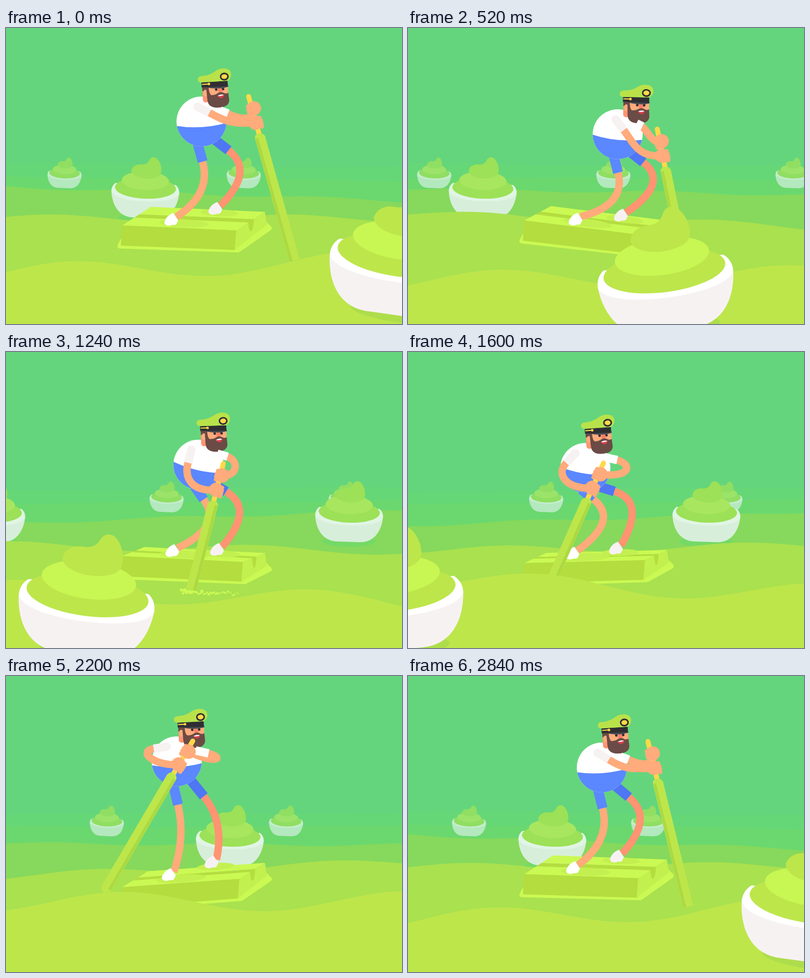
Write an HTML page with a canvas that moves like this. It is 800x600 px and loops after 2880 ms.

```html
<!DOCTYPE html>
<html lang="en">
<head>
<meta charset="utf-8">
<title>Matcha paddler</title>
<style>
html, body { margin: 0; width: 100%; height: 100%; overflow: hidden; background: #64d57d; }
canvas { display: block; width: 800px; height: 600px; }
</style>
</head>
<body>
<canvas width="800" height="600"></canvas>
<script>
const ctx = document.querySelector('canvas').getContext('2d');
const LOOP = 2880, STEP = 40, TAU = Math.PI * 2, RAD = Math.PI / 180;
const SKIN = '#ffab7b', SKIN_FAR = '#ff9472', BLUE = '#5b87ff', BLUE_FAR = '#4f76f3';
const LIME = '#bde64b', BRIGHT = '#cbf953', DARK_LIME = '#b4dd3f', WHITE = '#fff', OFF_WHITE = '#f7f2f2';
const HAIR = '#6b4b45', INK = '#302e33', YELLOW = '#ffd84a';
const OAR_LENGTH = 345, WATERLINE = 482;

const mod = (a, n) => ((a % n) + n) % n;
const random = seed => mod(Math.sin(seed * 12.9898) * 43758.5453, 1);
const add = (p, x, y) => [p[0] + x, p[1] + y];
const along = (p, u, d) => [p[0] + u[0] * d, p[1] + u[1] * d];
const heading = angle => [Math.sin(angle), Math.cos(angle)];

// Elbow or knee: the limb bends more, the closer its ends are.
function joint(from, to, bend, length) {
  const dx = to[0] - from[0], dy = to[1] - from[1], d = Math.hypot(dx, dy);
  const dir = heading(Math.atan2(dx, dy) + bend(d) * RAD);
  return { dir, point: along(from, dir, length(d)) };
}

function fill(path, color) {
  ctx.fillStyle = color;
  ctx.fill(new Path2D(path));
}
function poly(color, ...points) { fill('M' + points.join('L') + 'Z', color); }
function ellipse(color, x, y, rx, ry = rx, rot = 0) {
  ctx.fillStyle = color;
  ctx.beginPath();
  ctx.ellipse(x, y, rx, ry, rot, 0, TAU);
  ctx.fill();
}
function stroke(path, color, width, cap = 'butt') {
  Object.assign(ctx, { strokeStyle: color, lineWidth: width, lineCap: cap, lineJoin: 'round' });
  ctx.stroke(new Path2D(path));
}
function placed(x, y, degrees, draw, sx = 1, sy = sx) {
  ctx.save();
  ctx.translate(x, y);
  ctx.rotate(degrees * RAD);
  ctx.scale(sx, sy);
  draw();
  ctx.restore();
}

function ground(color, height) {
  let d = 'M0,600';
  for (let x = 0; x <= 800; x += 8) d += `L${x},${height(x)}`;
  fill(d + 'L800,600Z', color);
}

const palettes = {
  front: { cream: LIME, light: '#c8f652', rim: WHITE, body: OFF_WHITE },
  mid: { cream: '#9ce157', light: '#a8e65f', rim: '#e0f5e4', body: '#d7eeda' },
  far: { cream: '#90de62', light: '#9be369', rim: '#c3edcb', body: '#b4e8be' }
};
function bowl(x, y, rot, scale, c) {
  placed(x, y, rot, () => {
    fill('M-138,-27C-134,25 -108,78 -46,78L46,78C108,78 134,25 138,-27Z', c.body);
    fill('M-122,-60C-133,-52 -138,-40 -138,-27C-128,24 128,24 138,-27C138,-40 133,-52 122,-60Z', c.rim);
    ctx.scale(1, 1.06);
    ellipse(c.cream, 0, -41, 124, 41);
    ellipse(c.light, -1, -69, 96, 36);
    fill('M-60,-107C-56,-122 -41,-132 -21,-131C-1,-130 7,-139 12,-149C18,-161 29,-163 39,-158C54,-149 63,-127 62,-107C60,-87 34,-78 -1,-78C-36,-79 -60,-92 -60,-107Z', c.cream);
  }, scale);
}

// The whole figure follows from a few swings around the loop.
function poseAt(w) {
  const swing = (amp, lag, n = 1) => amp * Math.cos(n * w - lag * RAD);
  const reach = swing(1, 57), nod = swing(6, 90) - swing(4, 0, 2);
  const torso = [383 + swing(41, 73), 204 + swing(29.6, 142) + swing(16, 57, 2)];
  const grip = [442 + swing(69, 57) + swing(10.5, 0, 2), 180 + swing(58.6, 141) + swing(18.4, 76, 2)];
  const oarAngle = (-8.3 + swing(24, 44) + swing(7, 18, 2)) * RAD;
  const oarDir = heading(oarAngle);

  const boatY = 414 + swing(11, 215), pitch = 3 + swing(12, 80), depth = 28 + swing(10, -20);
  return {
    reach, torso, grip, oarAngle, oarDir,
    oarEnd: along(grip, oarDir, Math.min(OAR_LENGTH, (WATERLINE - grip[1]) / oarDir[1])),
    twist: 4 + swing(9.5, 143),
    head: add(torso, 50 + nod, -88.5 + .6 * nod),
    headTilt: -2 + .4 * nod,
    boat: { left: boatY - pitch, right: boatY + pitch, end: 472 - swing(7, 0), dx: 51 + swing(7, 0), dy: depth },
    nearFoot: [344 + swing(5, 90), boatY - 22],
    farFoot: [433 + swing(8, 90), boatY + .6 * pitch - depth - 10]
  };
}

function drawBoat({ boat: { left, right, end, dx, dy }, nearFoot, farFoot }) {
  const p = (u, d, x = 0, y = 0) => [235 + u * (end - 235) + d * dx + x, left + u * (right - left) - d * dy + y];
  const plate = 'M' + [p(0, 0, -5, 42), p(1, 0, 4, 40), p(1, 1, 9, 33), p(1, 1, 0, 24), p(0, 0, 0, 32)].join('L') + 'Z';
  fill(plate, BRIGHT);
  stroke(plate, BRIGHT, 10);
  poly('#c2f04e', p(1, 0), p(1, 1), p(1, 1, 4, 26), p(1, 0, -3, 40));
  poly(DARK_LIME, p(0, 0), p(1, 0), p(1, 0, -3, 40), p(0, 0, -3, 41));
  poly(BRIGHT, p(0, .6), p(0, 1), p(1, 1), p(1, .6));
  poly(DARK_LIME, p(0, .42), p(0, .6), p(1, .6), p(1, .42));
  poly(BRIGHT, p(0, 0), p(0, .42), p(1, .42), p(1, 0));
  fill(`M${p(1, .42)}C${p(1, .45, 0, 28)} ${p(1, .6, 0, 28)} ${p(1, .62)}Z`, DARK_LIME);
  const tilt = Math.atan2(right - left, end - 235);
  ellipse('#c3f050', ...add(nearFoot, 15, 13), 50, 8, tilt);
  ellipse('#c3f050', ...add(farFoot, -2, 14), 38, 7, tilt);
}

function leg(hip, foot, skin, cloth, shoe) {
  const knee = joint(hip, foot, d => 148 - .75 * d, d => .25 * d);
  const calf = along(knee.point, knee.dir, 68);
  stroke(`M${knee.point}Q${calf} ${foot}`, skin, 15);
  stroke(`M${hip}L${knee.point}`, cloth, 20);
  placed(...foot, 0, () =>
    fill('M-6,-8L4,7Q2,10 1,13Q-1,17 -8,16Q-14,19 -20,17Q-26,14 -23,7Q-18,-4 -6,-8Z', shoe));
}

function drawTorso({ torso, twist }) {
  placed(...torso, twist, () => {
    ellipse(WHITE, 0, 0, 50.5);
    ctx.beginPath();
    ctx.arc(0, 0, 50.5, 0, TAU);
    ctx.clip();
    fill('M-55,5Q0,18 55,5V55H-55Z', BLUE);
  });
}

function drawHead({ head, headTilt }) {
  placed(...head, headTilt, () => {
    fill('M-46,24H-34V44Q-35,51 -41,50Q-47,49 -46,41Z', SKIN_FAR);
    fill('M-46,18H-36V27H-46Z', HAIR);
    ellipse(SKIN, -40, 31, 5, 7);
    fill('M-36,18H6V44H-36Z', SKIN);
    ellipse('#ff8068', -10, 27, 5, 5);
    ellipse(INK, -18, 25, 2.6);
    ellipse(INK, -4, 25, 2.6);
    fill('M-38,18H-33Q-33,34 -28,36Q-20,36 -16,33Q-9,29 -3,33Q2,36 6,33L7,48Q6,62 -15,62Q-36,62 -37,46Z', HAIR);
    fill('M-16,38Q-9,34 -3,37Q-3,43 -9,43Q-14,43 -16,38Z', '#d8404a');
    fill('M-16,38Q-9,34 -3,37Q-9,40 -16,38Z', WHITE);
    fill('M-36,17H6L7,21Q-12,26 -36,20Z', '#454a50');
    fill('M-47,9H6V20L-47,19Z', INK);
    fill('M-46,9C-57,9 -56,-4 -46,-4C-34,-4 -26,-7 -18,-12C-8,-19 10,-18 13,-9C16,-1 12,5 7,9Z', '#b9e24a');
    ellipse(INK, 0, 0, 9, 8);
    ellipse(YELLOW, 0, 0, 6, 4.8);
    stroke('M-46,13H-33', YELLOW, 2.2);
    ellipse(YELLOW, -32, 13, 2.6);
  });
}

function drawHand([x, y], side, angle) {
  placed(x, y, -angle / RAD, () => {
    ellipse(SKIN, 0, 0, 14.5);
    for (let i = 0; i < 4; i++) ellipse(SKIN, side * (12 - Math.abs(i - 1.5)), -7 + i * 6, 4.4);
  });
}

function drawOar({ grip, oarEnd, oarDir }) {
  const start = along(grip, oarDir, 86);
  stroke(`M${grip}L${start}`, YELLOW, 10, 'round');
  stroke(`M${start}L${oarEnd}`, LIME, 21, oarEnd[1] < 450 ? 'round' : 'butt');
  ellipse(LIME, ...start, 10.5, 8);
  const side = oarDir[0] < 0 ? 7 : -7;
  const shift = [side * oarDir[1], -side * oarDir[0]];
  stroke(`M${add(start, ...shift)}L${add(oarEnd, ...shift)}`, '#acd942', 6);
}

function splash([x], t) {
  if (t < 700 || t > 1560) return;
  const length = Math.min(115, 35 + (t - 700) * .25);
  const start = x + 8 - (t - 840) * .07;
  for (let i = 0; i < 34; i++) {
    const u = i / 33;
    ellipse(BRIGHT, start + u * length, 486 + u * 4 + (random(i) - .5) * 7, (4.6 - 2.6 * u) * (.5 + .6 * random(i + 50)));
  }
}

function drawPaddler(pose, t) {
  const { torso, grip, reach, oarDir, oarAngle } = pose;
  const upperHand = add(along(grip, oarDir, 25), 4, 0), lowerHand = add(along(grip, oarDir, 55), -1, 0);

  leg(add(torso, 28, 38), pose.farFoot, SKIN_FAR, BLUE_FAR, '#f7f1f4');
  leg(add(torso, -8, 44), pose.nearFoot, SKIN, BLUE, WHITE);
  drawTorso(pose);
  drawHead(pose);

  const cuff = add(torso, 57 - 8 * reach, -16);
  const bend = add(cuff, 23 - 12 * reach, 8);
  const elbow = add(upperHand, 25 - 45 * reach, 25 + .6 * (cuff[1] - upperHand[1]));
  stroke(`M${cuff}C${bend} ${elbow} ${upperHand}`, SKIN, 15);
  stroke(`M${add(torso, 38, -22)}L${add(cuff, 1, 0)}`, WHITE, 17);

  splash(pose.oarEnd, t);
  drawOar(pose);
  drawHand(upperHand, -1, oarAngle);

  const shoulder = add(torso, -13 + 9 * reach, -30);
  const sleeve = joint(shoulder, lowerHand, d => 1.3 * d - 170, () => 27);
  stroke(`M${sleeve.point}C${along(sleeve.point, sleeve.dir, 34)} ${add(lowerHand, -48, 4)} ${lowerHand}`, SKIN, 15);
  ellipse(OFF_WHITE, ...shoulder, 8.5);
  stroke(`M${shoulder}L${sleeve.point}`, OFF_WHITE, 17);
  drawHand(lowerHand, 1, oarAngle);
}

function draw(t) {
  const w = TAU * t / LOOP, sin = Math.sin(w), cos = Math.cos(w);
  const swell = (base, tilt, amp, length, crest, speed) => x =>
    base + tilt * (x - 400) - amp * Math.cos(TAU * (x - crest + speed * t) / length);

  ctx.fillStyle = '#64d57d';
  ctx.fillRect(0, 0, 800, 600);
  ground('#66d777', swell(278, .01 * cos, 2, 720, 200, .25));
  ground('#6ad86e', swell(305, .012 * cos, 2, 720, 500, .25));

  const farX = mod(118 - t * 362 / LOOP, 362);
  for (let i = -1; i < 3; i++) bowl(farX + i * 362, 305, 2, .25, palettes.far);
  ground('#86d95c', swell(336 - 5 * sin, .037 * cos, 3, 360, 280, .25));

  const midX = mod(281 - t * 723 / LOOP, 723);
  for (const x of [midX - 723, midX, midX + 723]) {
    ellipse('#74d966', x, 384, 54, 11);
    bowl(x, 346, 2, .497, palettes.mid);
  }
  ground('#a9e14f', swell(392 - 6 * cos, .036 * sin, 8, 480, 90, 480 * 5 / LOOP));

  const pose = poseAt(w);
  drawBoat(pose);
  drawPaddler(pose, t);
  ground(LIME, swell(483 + 26 * sin, -.037 * cos, 20, 576, 130, 1));

  const bowlX = mod(787 - t * 1458 / LOOP + 400, 1458) - 400;
  const bowlY = 517 + 26 * Math.cos(w - 122 * RAD) + 5 * Math.sin(2 * w);
  const rock = 8 * Math.cos(TAU * (bowlX - 790) / 590);
  ellipse('#aedd4c', bowlX + 8, bowlY + 74, 100, 20, rock * RAD);
  bowl(bowlX, bowlY, rock, 1, palettes.front);
}

const began = performance.now();
function frame() {
  const t = (performance.now() - began) % LOOP;
  draw(Math.floor(t / STEP) * STEP);
  requestAnimationFrame(frame);
}
frame();
</script>
</body>
</html>
```
